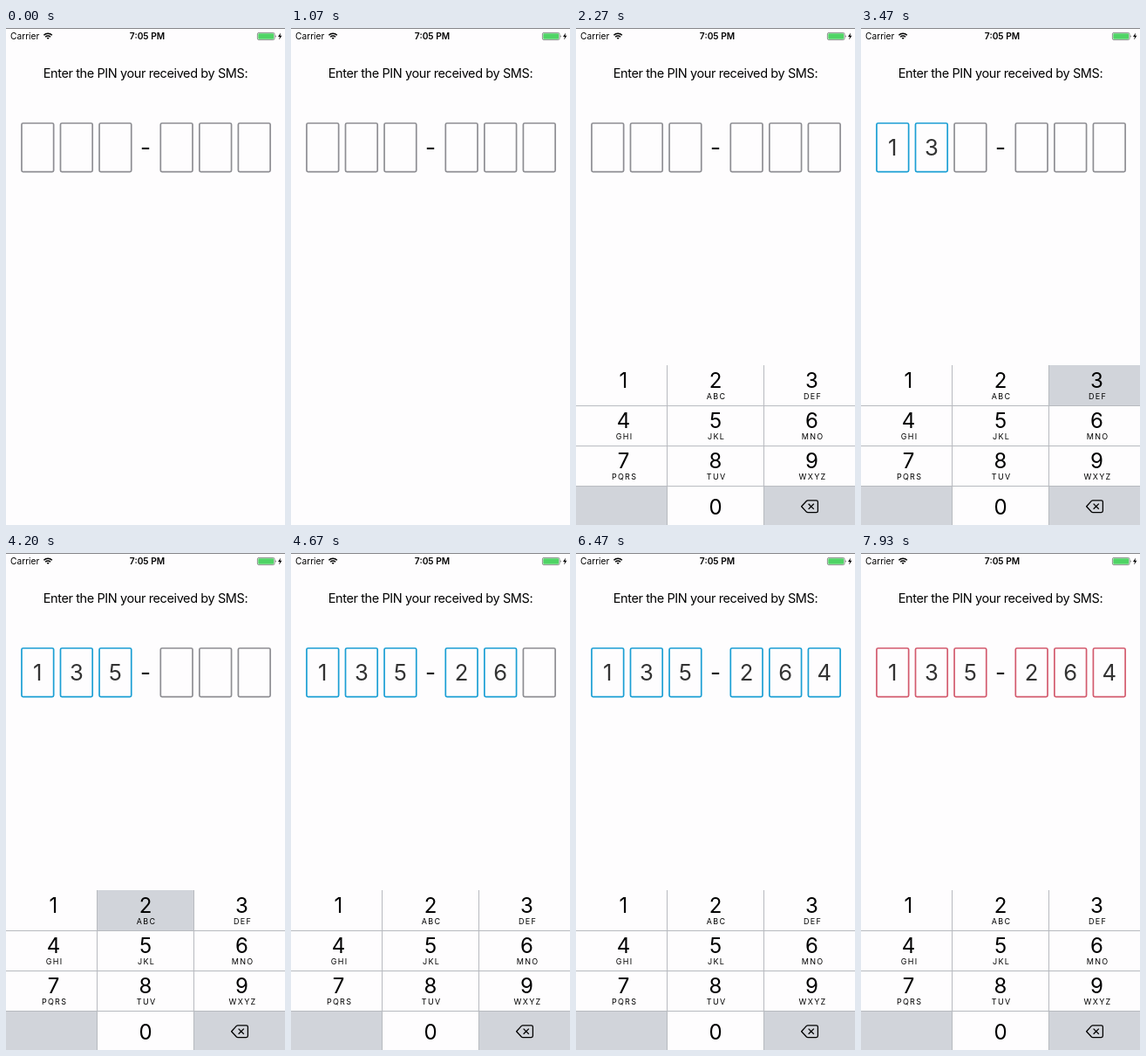
An HTML page that plays this animation: 320x569 px, repeating every 8000 ms.

```html
<!DOCTYPE html>
<html lang="en">
<head>
<meta charset="utf-8">
<title>PIN entry</title>
<style>
  html, body { margin: 0; width: 100%; height: 100%; overflow: hidden; background: #fefdfe; }
  svg { display: block; width: 100%; height: 100%; }
  text { font-family: Inter, Roboto, sans-serif; text-anchor: middle; fill: #000; }
  .status { font-size: 10.2px; }
  .title { font-size: 14.5px; letter-spacing: -.4px; }
  .pin { font-size: 25.6px; fill: #333; }
  .key { font-size: 24px; }
  .sub { font-size: 9px; letter-spacing: 1.3px; }
  .box { fill: none; stroke-width: 1.7; }
</style>
</head>
<body>
<svg id="stage" viewBox="0 0 320 569">
  <path d="M0 .5H320" stroke="#85858a"/>
  <text class="status" x="5" y="13.3" style="text-anchor:start">Carrier</text>
  <g fill="none" stroke="#000" stroke-width="1.5">
    <path d="M43.4 8.2A6.6 6.6 0 0 1 52.8 8.2M45.2 10.2A4 4 0 0 1 51 10.2"/>
    <path d="M46.6 11.3Q48.1 10.2 49.6 11.3L48.1 13Z" fill="#000" stroke="none"/>
  </g>
  <text class="status" x="162" y="13.3" font-weight="600">7:05 PM</text>
  <rect x="288.4" y="5.4" width="19.6" height="8.2" rx="1.6" fill="none" stroke="#6f7a72" stroke-width=".8"/>
  <rect x="289.3" y="6.3" width="17.8" height="6.4" rx=".8" fill="#4fd465"/>
  <path d="M308.9 8Q310.4 9.5 308.9 11Z" fill="#333"/>
  <path d="M315 5.5L312 10H314L313.2 13.5L316.4 8.8H314.4Z"/>
  <text class="title" x="160" y="57">Enter the PIN your received by SMS:</text>
  <rect x="155.8" y="136.9" width="8.4" height="2"/>
  <g id="pins"></g>
  <g id="pad"></g>
</svg>
<script>
const LOOP = 8000, PAD_IN = 1925, FAIL = 7395;
const GREY = '#8e8e93', BLUE = '#1b9fd4', RED = '#d35b6e', DOWN = '#d1d4da';
const PRESSES = [['1', 2925], ['3', 3395], ['5', 3795], ['2', 4195], ['6', 4525], ['4', 5195]];
const DIGIT_DELAY = 65, HOLD = 132;
const LETTERS = ['', 'ABC', 'DEF', 'GHI', 'JKL', 'MNO', 'PQRS', 'TUV', 'WXYZ'];
const EDGES = [0, 104.5, 215.5, 320], CENTERS = [54.5, 160, 270.5];
const TOP = 386, ROW = 46.2;

const pins = document.getElementById('pins'), pad = document.getElementById('pad');

function add(parent, tag, attrs, text = '') {
  const el = document.createElementNS('http://www.w3.org/2000/svg', tag);
  for (const name in attrs) el.setAttribute(name, attrs[name]);
  el.textContent = text;
  return parent.appendChild(el);
}

const slots = PRESSES.map(([digit], i) => {
  const x = 17.1 + 44.55 * i + (i > 2 ? 25.7 : 0);
  return {
    box: add(pins, 'rect', { class: 'box', x: x + .85, y: 109, width: 36.7, height: 55.6, rx: 1.6 }),
    text: add(pins, 'text', { class: 'pin', x: x + 19.2, y: 146.3 }, digit)
  };
});

const keys = {};
function addCell(col, row, fill) {
  return add(pad, 'rect', {
    x: EDGES[col], y: TOP + ROW * row, width: EDGES[col + 1] - EDGES[col], height: ROW, fill
  });
}
for (let i = 0; i < 9; i++) {
  const col = i % 3, row = Math.floor(i / 3), y = TOP + ROW * row;
  keys[i + 1] = addCell(col, row, '#fefdfe');
  add(pad, 'text', { class: 'key', x: CENTERS[col], y: y + 26 }, i + 1);
  add(pad, 'text', { class: 'sub', x: CENTERS[col] + 1.1, y: y + 38.6 }, LETTERS[i]);
}
addCell(0, 3, DOWN);
addCell(1, 3, '#fefdfe');
addCell(2, 3, DOWN);
add(pad, 'text', { class: 'key', x: 160, y: 556.6 }, '0');
add(pad, 'path', {
  d: 'M0 432.5H320M0 478.5H320M0 524.5H320M104.5 386V570M215.5 386V570',
  stroke: '#b7babf', fill: 'none'
});
add(pad, 'path', {
  d: 'M258.6 547.7L264.4 541.4Q265 540.8 266 540.8H275.6Q277.4 540.8 277.4 542.6V552.8' +
     'Q277.4 554.6 275.6 554.6H266Q265 554.6 264.4 554ZM266.6 544.6L272.8 550.8M272.8 544.6L266.6 550.8',
  stroke: '#000', 'stroke-width': 1.3, 'stroke-linejoin': 'round', fill: 'none'
});

function draw(t) {
  const shown = t >= PAD_IN;
  pad.setAttribute('visibility', shown ? 'visible' : 'hidden');
  pad.setAttribute('transform', `translate(0 ${shown ? 11 * Math.exp((PAD_IN - t) / 70) : 0})`);
  PRESSES.forEach(([digit, at], i) => {
    const typed = t >= at + DIGIT_DELAY, down = t >= at && t < at + HOLD;
    keys[digit].setAttribute('fill', down ? DOWN : '#fefdfe');
    slots[i].text.setAttribute('visibility', typed ? 'visible' : 'hidden');
    slots[i].box.setAttribute('stroke', t >= FAIL ? RED : typed ? BLUE : GREY);
  });
}

function tick() {
  draw(performance.now() % LOOP);
  requestAnimationFrame(tick);
}
tick();
</script>
</body>
</html>
```
